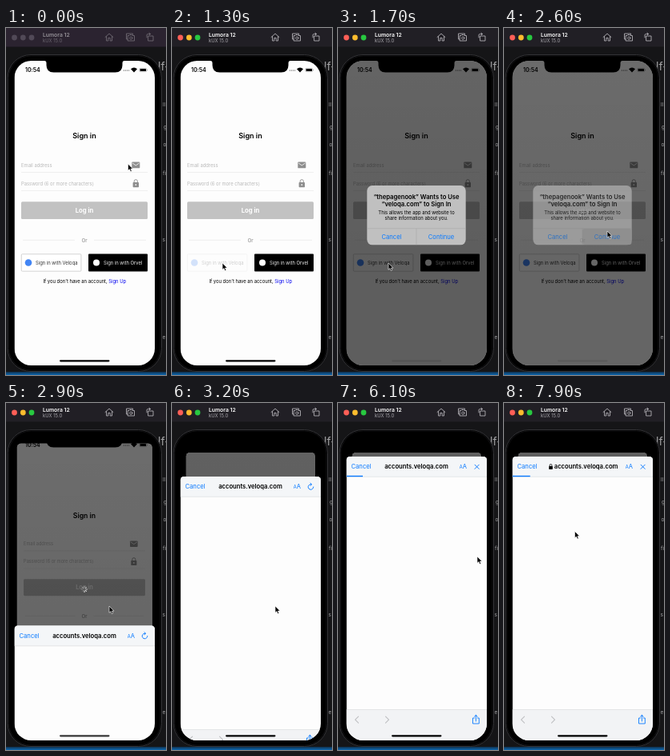
Animation of 200 by 434 pixels, one loop 8 s. Source, as an HTML page:

```html
<!DOCTYPE html>
<html lang="en">
<head>
<meta charset="utf-8">
<title>Sign in flow</title>
<style>
  html, body { margin: 0; width: 100%; height: 100%; overflow: hidden; background: #131416; }
  svg { display: block; width: 100vw; height: 100vh; }
  text { font: 5.85px Inter, Roboto, sans-serif; }
  .h { font-size: 7.65px; }
  .b { font-weight: 600; }
  .mid { text-anchor: middle; }
  .grey { fill: #b9b9b9; }
  .blue { fill: #0a7aff; }
  .line { fill: none; stroke-linecap: round; stroke-linejoin: round; }
  .edge text { fill: #a2a2a4; font-size: 6.5px; }
</style>
</head>
<body>
<svg viewBox="0 0 200 434" preserveAspectRatio="none">
  <defs>
    <clipPath id="glass"><rect x="10.5" y="41" width="175.5" height="381" rx="21"/></clipPath>
    <linearGradient id="shade" x1="0" y1="0" x2="0" y2="1">
      <stop offset="0" stop-color="#000" stop-opacity=".96"/>
      <stop offset=".65" stop-color="#000"/>
    </linearGradient>
    <linearGradient id="strip" x1="0" y1="0" x2="0" y2="1">
      <stop offset="0" stop-color="#10304c"/>
      <stop offset="1" stop-color="#0c68b2"/>
    </linearGradient>
  </defs>

  <!-- desktop -->
  <rect width="200" height="434" fill="#151517"/>
  <g class="edge">
    <text x="190" y="53" style="font-size:14px">lf-</text>
    <text x="196" y="98">ll</text><text x="197" y="126">g</text>
    <text x="196.5" y="148">o</text><text x="196" y="184">fi</text>
    <text x="195.5" y="267">s</text><text x="195.5" y="389">e</text>
  </g>
  <rect y="430" width="200" height="4" fill="url(#strip)"/>

  <!-- window bar -->
  <rect id="bar" width="200" height="23.5"/>
  <g id="lights">
    <circle cx="10.5" cy="12" r="3.4"/><circle cx="21.3" cy="12" r="3.4"/><circle cx="32" cy="12" r="3.4"/>
  </g>
  <g id="title">
    <text class="b" x="46" y="11" fill="#fff" style="font-size:6.8px">Lumora 12</text>
    <text x="46" y="18.4" fill="#a9a7ad">kUX 15.0</text>
    <g class="line" stroke="#b0aeb4" stroke-width=".9">
      <path d="M124 11.5L129 7l5 4.500M125.500 10.500V16h2.300v-3.500h2.400V16h2.300v-5.500"/>
      <path d="M152 14H150.500V7h8v1.500M152.500 9.500h1.500l.8-1h2.400l.8 1h2.500V16h-8z"/>
      <circle cx="156.3" cy="12.6" r="1.6"/>
      <path d="M178 10h6v6h-6zM176 12V9q0-1.500 1.500-1.500h3M179 6l1.600 1.500-1.600 1.500"/>
    </g>
  </g>

  <!-- phone -->
  <rect x="2" y="33.5" width="192.5" height="396" rx="29" fill="#000" stroke="#333336"/>
  <rect x="3.6" y="35" width="189.3" height="393" rx="27.5" fill="none" stroke="#161618" stroke-width=".8"/>

  <g clip-path="url(#glass)">
    <g id="page">
      <rect class="card" x="10.5" y="41" width="175.5" height="381" fill="#fdfdfd"/>
      <text class="b mid" x="98" y="138" style="font-size:9px">Sign in</text>
      <text class="grey" x="19" y="173.5">Email address</text>
      <text class="grey" x="19" y="196.7">Password (6 or more characters)</text>
      <path d="M19 180.5H177M19 203.5H177" stroke="#e6e6e6" stroke-width=".6"/>
      <rect x="157.3" y="167.5" width="10" height="7.8" rx=".9" fill="#8e8e8e"/>
      <path class="line" d="M158.4 169.2l3.9 2.7 3.9-2.7" stroke="#fff" stroke-width=".8"/>
      <rect x="158.6" y="193" width="7.4" height="6.3" rx=".8" fill="#8e8e8e"/>
      <path class="line" d="M160.2 193v-1.3a2.1 2.1 0 0 1 4.2 0V193" stroke="#8e8e8e" stroke-width=".9"/>
      <circle cx="162.3" cy="196.1" r=".9" fill="#fff"/>
      <rect x="19" y="217.3" width="158" height="21.8" rx="1.5" fill="#c2c2c2"/>
      <text class="h mid" x="98" y="231" fill="#fff" font-weight="700" style="font-weight:700">Log in</text>
      <path d="M21 265.3H86M110 265.3H175" stroke="#e4e4e4" stroke-width=".6"/>
      <text class="mid" x="98" y="267.5" fill="#8d8d8d" style="font-size:6.3px">Or</text>
      <g id="first">
        <rect x="19.3" y="282.8" width="74.6" height="21.4" rx="1" fill="#fff" stroke="#c2c2c2" stroke-width=".7"/>
        <circle cx="28" cy="293.5" r="4.3" fill="#4285f4"/>
        <text x="37" y="295.6" fill="#333">Sign in with Veloqa</text>
      </g>
      <rect x="103" y="282.5" width="74" height="22" rx="1" fill="#000"/>
      <circle cx="113" cy="293.5" r="4" fill="#fff"/>
      <text x="122" y="295.6" fill="#eee">Sign in with Orvel</text>
      <text class="mid" x="98.3" y="319.2">If you don't have an account, <tspan fill="#0000f0">Sign Up</tspan></text>
      <rect id="dim" class="card" x="10.5" y="41" width="175.5" height="381" fill="url(#shade)"/>
    </g>

    <g id="spinner" class="line" stroke="#e8e8e8" stroke-width="1"></g>

    <text class="b" x="24" y="54.9" style="font-size:7px">10:54</text>
    <g>
      <circle cx="147.3" cy="53" r=".5"/><circle cx="149.4" cy="53" r=".5"/>
      <circle cx="151.5" cy="53" r=".5"/><circle cx="153.6" cy="53" r=".5"/>
      <path d="M156 51.2q4-3.400 8 0L160 55.400z"/>
      <rect x="166.900" y="50.200" width="8.800" height="4.600" rx="1.300" fill="none" stroke="#000" stroke-opacity=".4" stroke-width=".5"/>
      <rect x="167.600" y="50.900" width="7.400" height="3.200" rx=".7"/>
      <rect x="176.200" y="51.700" width=".6" height="1.600" rx=".3" fill-opacity=".5"/>
    </g>
    <path d="M48 41h100q-2.500 0-2.500 3v2.500q0 9-9 9h-77q-9 0-9-9V44q0-3-2.500-3z"/>

    <g id="alert">
      <rect x="36.3" y="197" width="123.4" height="74.3" rx="6.5" fill="#c0c0c0"/>
      <rect id="tap" x="98" y="251" width="61.5" height="20" rx="3" fill="#acacac"/>
      <text class="h b mid" x="98" y="213.6">“thepagenook” Wants to Use</text>
      <text class="h b mid" x="98" y="222.8">“veloqa.com” to Sign In</text>
      <text class="mid" x="98" y="232.5">This allows the app and website to</text>
      <text class="mid" x="98" y="239.9">share information about you.</text>
      <path d="M36.3 250.8H159.7M98 250.8V271.3" stroke="#a2a2a2" stroke-width=".5"/>
      <text class="h mid blue" x="67" y="264">Cancel</text>
      <text class="h mid blue" x="129" y="264">Continue</text>
    </g>

    <!-- browser sheet, drawn at its resting place -->
    <g id="sheet">
      <rect x="10.5" y="67" width="175.5" height="370" rx="4.5" fill="#fdfdfd"/>
      <path d="M10.5 92.3V71.5q0-4.5 4.5-4.5H181.5q4.5 0 4.5 4.5V92.3z" fill="#f4f6f8"/>
      <path d="M10.5 92.3H186" stroke="#cfd0d3" stroke-width=".5"/>
      <text class="h blue" x="16.5" y="82.2">Cancel</text>
      <text id="site" class="h b mid" x="98" y="82.2">accounts.veloqa.com</text>
      <g id="lock">
        <rect x="56.2" y="79" width="4.6" height="3.9" rx=".6"/>
        <path class="line" d="M57.2 79v-1.2a1.3 1.3 0 0 1 2.6 0V79" stroke="#000" stroke-width=".8"/>
      </g>
      <text class="blue" x="151.8" y="82.2" style="font-size:5.6px">A<tspan style="font-size:7.6px">A</tspan></text>
      <g class="line" stroke="#0a7aff" stroke-width=".95">
        <path id="reload" d="M176.8 80a3.3 3.3 0 1 1-2.5-3.2M173 75.3l1.6 1.5-1.6 1.5"/>
        <path id="stop" d="M171 77.2l5.2 5.2M176.2 77.2l-5.2 5.2"/>
      </g>
      <rect id="load" x="10.5" y="90.8" height="1.4" fill="#0a7aff"/>
      <rect x="10.5" y="383.5" width="175.5" height="50" fill="#f2f3f5"/>
      <path d="M10.5 383.5H186" stroke="#cfd0d3" stroke-width=".5"/>
      <g class="line" stroke="#bfc0c3" stroke-width="1.1">
        <path d="M25.5 392.2l-4 4 4 4M59.5 392.2l4 4-4 4"/>
        <path stroke="#0a7aff" stroke-width=".9" d="M170.5 394H168.5v7h7.8v-7h-2M172.4 398v-7.5M170.4 392.3l2-2 2 2"/>
      </g>
    </g>
    <rect id="home" x="67" y="415.2" width="62.5" height="2.3" rx="1.15"/>
  </g>

  <path id="cursor" d="M0 0V8.3L1.9 6.6 3.2 9.6 4.7 8.9 3.4 6.1H6z" fill="#000" stroke="#fff" stroke-width=".6"/>
</svg>

<script>
const LOOP = 8000;
const $ = id => document.getElementById(id);
const set = (id, attrs) => { for (const k in attrs) $(id).setAttribute(k, attrs[k]); };
const clamp = v => Math.max(0, Math.min(1, v));
const ramp = (t, a, b) => clamp((t - a) / (b - a));
const smooth = v => v * v * (3 - 2 * v);
const mix = (a, b, v) => a + (b - a) * v;

// time, x, y of the pointer tip
const path = [
  [0, 152.5, 170], [100, 152.5, 170], [600, 58, 307], [900, 63, 294],
  [1900, 63, 294], [2300, 129, 254], [4950, 129, 254], [5350, 174, 192],
  [6500, 174, 192], [7100, 88.5, 160.5], [LOOP, 88.5, 160.5]
];

function pointer(t) {
  const i = path.findIndex(p => p[0] > t);
  const [a, b] = [path[i - 1], path[i]];
  const v = smooth(ramp(t, a[0], b[0]));
  return [mix(a[1], b[1], v), mix(a[2], b[2], v)];
}

const spokes = Array.from({ length: 8 }, (_, i) => {
  const s = document.createElementNS("http://www.w3.org/2000/svg", "path");
  s.setAttribute("d", "M98 229.4V231");
  s.setAttribute("transform", `rotate(${i * 45} 98 233)`);
  $("spinner").append(s);
  return s;
});

function draw(t) {
  const active = t >= 1000;
  set("bar", { fill: active ? "#211f25" : "#2b2330" });
  set("title", { opacity: active ? 1 : .5 });
  const colors = active ? ["#ff5f57", "#febc2e", "#28c840"] : Array(3).fill("#514957");
  [...$("lights").children].forEach((c, i) => c.setAttribute("fill", colors[i]));

  const press = ramp(t, 1150, 1250) - ramp(t, 1400, 1550);
  set("first", { opacity: 1 - .78 * press });

  const shown = ramp(t, 1500, 1680);
  const gone = ramp(t, 2500, 2750);
  set("alert", { opacity: shown * (1 - gone) });
  set("tap", { opacity: t >= 2350 ? 1 : 0 });

  // the sheet rises while the page behind it shrinks slightly ahead
  const rise = 1 - (1 - ramp(t, 2790, 3490)) ** 3;
  const shrink = Math.min(1, rise * 1.15);
  const s = 1 - .083 * shrink;
  set("page", { transform: `translate(${98 * (1 - s)} ${41 + 21 * shrink - 41 * s}) scale(${s})` });
  document.querySelectorAll(".card").forEach(c => c.setAttribute("rx", Math.min(5, rise * 20)));
  set("dim", { opacity: .63 * shown - .07 * gone + .09 * rise });
  set("sheet", { transform: `translate(0 ${355 * (1 - rise)})` });
  set("home", { opacity: 1 - .9 * shown * (1 - rise ** .3) });

  set("spinner", { opacity: t >= 1600 ? 1 : 0 });
  const step = Math.floor(t / 100);
  spokes.forEach((p, i) => p.setAttribute("opacity", .2 + .8 * ((i - step % 8 + 8) % 8) / 7));

  const loading = t >= 3700, secure = t >= 7400;
  set("reload", { opacity: loading ? 0 : 1 });
  set("stop", { opacity: loading ? 1 : 0 });
  set("load", { width: 20.5 * smooth(ramp(t, 3700, 4300)) + 1.7 * ramp(t, 7300, 7600) });
  set("site", { x: secure ? 102.6 : 98 });
  set("lock", { opacity: secure ? 1 : 0 });

  set("cursor", { transform: `translate(${pointer(t).join(" ")})` });
}

const start = performance.now();
function tick() {
  draw((performance.now() - start) % LOOP);
  requestAnimationFrame(tick);
}
tick();
</script>
</body>
</html>
```
